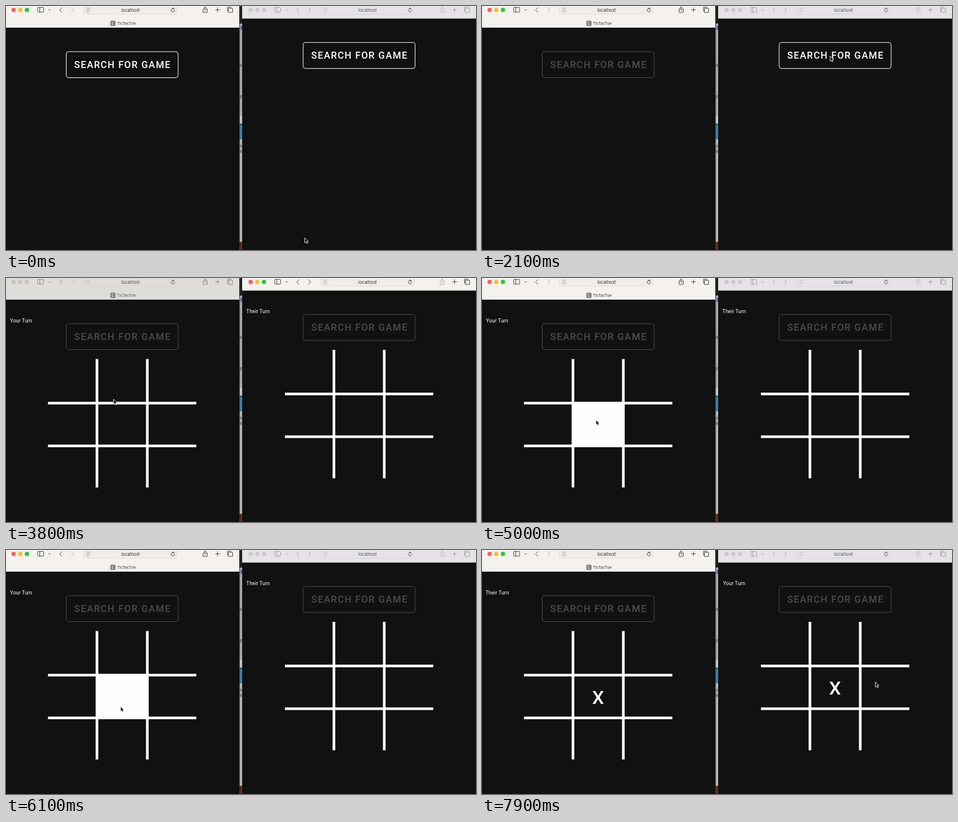
Animation, 800 px wide and 417 px high, one loop 8000 ms. Source, as an HTML page:

```html
<!DOCTYPE html>
<html lang="en">
<head>
<meta charset="utf-8">
<title>TicTacToe</title>
<style>
  html, body { margin: 0; width: 100%; height: 100%; overflow: hidden; background: #111; }
  svg { display: block; width: 100vw; height: 100vh; }
  text { text-anchor: middle; fill: #fff; font-family: Roboto, sans-serif; }
  .ui { font: 7.4px Inter, sans-serif; }
  .start { font-size: 16.2px; font-weight: 500; letter-spacing: 1.3px; }
  .turn { font-size: 8.8px; letter-spacing: .06px; }
  .mark { font-size: 32px; font-weight: 500; }
  .icon { fill: none; stroke-width: 1; stroke-linecap: round; stroke-linejoin: round; }
</style>
</head>
<body>
<svg id="stage" viewBox="0 0 800 417" preserveAspectRatio="none"></svg>
<script>
const LOOP = 8000, TICK = 100;
const FOCUS_RIGHT = 2300, BOARD = 2800, FOCUS_LEFT = 4300, MOVE = 6600;

// Pointer stops: time, x, y
const stops = [
  [100, 508.5, 396], [300, 484.5, 83.5], [500, 484.5, 83.5], [1100, 261.5, 111.5],
  [1400, 261.5, 111.5], [2100, 592.5, 85.5], [2500, 592.5, 85.5], [3100, 433, 200],
  [3200, 433, 200], [3800, 183, 207], [4100, 187, 226], [5000, 194, 242.5],
  [5300, 194, 242.5], [6100, 195, 267.5], [6600, 195, 267.5], [7300, 627, 229],
  [7800, 669.5, 225.5]
];

const clamp = v => Math.max(0, Math.min(1, v));
const ease = v => { v = clamp(v); return v * v * (3 - 2 * v); };
const mix = (a, b, k) => a + (b - a) * k;
const rect = (x, y, w, h, attrs) => `<rect x="${x}" y="${y}" width="${w}" height="${h}" ${attrs}/>`;
const text = (x, y, cls, s, attrs = '') => `<text x="${x}" y="${y}" class="${cls}" ${attrs}>${s}</text>`;
const icon = (d, color) => `<path class="icon" d="${d}" stroke="${color}"/>`;

function pointer(t) {
  const i = stops.findIndex(s => s[0] > t);
  if (i === 0) return stops[0].slice(1);
  if (i < 0) return stops[stops.length - 1].slice(1);
  const [a, b] = [stops[i - 1], stops[i]], k = ease((t - a[0]) / (b[0] - a[0]));
  return [mix(a[1], b[1], k), mix(a[2], b[2], k)];
}

function toolbar(left, active) {
  const bg = active ? '#f4f2ef' : left ? '#dfddda' : '#e5e3e6';
  const dark = active ? '#4b4a49' : left ? '#8b8987' : '#a3a1a4';
  const pale = active ? '#b3b1af' : '#c4c2c2';
  const ink = active ? '#333' : '#555';
  const lights = active ? ['#fe5f57', '#febc2e', '#28c840'] : Array(3).fill(left ? '#c6c4c1' : '#cbc9cc');
  return rect(-1.5, 0, 399, left ? 37 : 21.5, `fill="${bg}"`) +
    lights.map((c, i) => `<circle cx="${13 + 11.3 * i}" cy="6.8" r="3.7" fill="${c}"/>`).join('') +
    icon('M55 2.5h8q1 0 1 1v6q0 1-1 1h-8q-1 0-1-1v-6q0-1 1-1zM57.5 2.5v8', dark) +
    icon('M72.6 6l1.7 1.7L76 6', dark) +
    icon('M95.3 2.8l-4 4 4 4', dark) +
    icon('M111.3 2.8l4 4-4 4', left ? pale : dark) +
    rect(132, -6, 159, 20, `rx="4" fill="${active ? '#efedea' : bg}" stroke="${active ? '#dad8d5' : '#d3d1d2'}" stroke-width=".8"`) +
    icon('M137 3.5h6M137 6h6M137 8.5h2M141 8.5h2M137 10.5h4', pale) +
    text(212, 9.5, 'ui', 'localhost', `style="fill:${ink}"`) +
    icon('M286.6 5.2a3 3 0 1 0 .6 2.2M284.2 3l1.6 1.5-1.6 1.4', ink) +
    icon('M337.5 5h-2v6h7V5h-2M339 8V1.5M337 3.4l2-2 2 2', left ? dark : pale) +
    icon('M356.5 6.5h7M360 3v7', dark) +
    icon('M379 4h6.5v7H379zM377 9V2h6.5', dark) +
    (left ? rect(177.5, 25, 9, 9.2, 'rx="2" fill="#83808e"') + text(182, 32.2, 'ui', 'L') +
      `<text x="189" y="32.2" class="ui" style="fill:${ink};text-anchor:start;font-size:6.7px">TicTacToe</text>` : '');
}

function ripple(t, start, end, x, y) {
  if (t < start || t >= end) return '';
  const k = ease((t - start) / 250), alpha = .15 * clamp((end - t) / 200);
  return `<circle cx="${mix(x, 197.5, k)}" cy="${mix(y, 100, k)}" r="${96 * mix(.3, 1, k)}"
    fill="#fff" opacity="${alpha}" clip-path="url(#button)"/>`;
}

function board(mine, hover, played) {
  const bars = [[152.6, 138.5, 4.5, 219.5], [238.3, 138.5, 4.5, 219.5], [71.5, 211.6, 252.5, 4.5], [71.5, 284.7, 252.5, 4.5]];
  return bars.map(b => rect(...b, 'fill="#fff"')).join('') +
    (hover ? rect(153, 212, 89.5, 77, 'fill="#fefefe"') : '') +
    (played ? text(197.5, 262.6, 'mark', 'X') : '') +
    text(25.8, 76.1, 'turn', mine ? 'Your Turn' : 'Their Turn');
}

function page(t, left, [px, py]) {
  const off = left ? t >= 1600 : t >= BOARD;
  const played = t >= MOVE;
  const hover = left && t >= FOCUS_LEFT && px > 153 && px < 242 && py > 212 && py < 289;
  return (left ? ripple(t, 1200, 1600, 261.5, 111.5) : ripple(t, 2500, BOARD, 189, 101)) +
    `<g opacity="${off ? .24 : 1}">` +
    rect(102.5, 78, 190.5, 44.5, 'rx="4" fill="none" stroke="#fff" stroke-width="1"') +
    text(198.5, 106.1, 'start', 'SEARCH FOR GAME') + '</g>' +
    (t >= BOARD ? board(left !== played, hover, played) : '');
}

// Sliver of the desktop between the two windows
const gap = '<g clip-path="url(#gap)">' +
  [[0, 30, '#222'], [30, 157, '#a6a6a6'], [187, 15, '#c2c2c2'], [202, 26, '#3c84a4'], [228, 175, '#b3b3b3'], [403, 14, '#5c2c19']]
    .map(([y, h, c]) => rect(397, y, 5, h, `fill="${c}"`)).join('') +
  rect(397, 201, 5, 2.5, 'fill="#24566d"') + rect(399, 34, 3, 7, 'fill="#536fa8"') +
  [[104, 'te'], [158, 'in'], [242, 's'], [251, 'e']].map(([y, s]) => text(400, y, 'ui', s, 'style="fill:#333"')).join('') +
  rect(397, 0, .8, 417, 'fill="#333"') + '</g>';

const defs = `<defs><clipPath id="button">${rect(102.5, 78, 190.5, 44.5, 'rx="4"')}</clipPath>
  <clipPath id="gap">${rect(397, 0, 5, 417, '')}</clipPath></defs>`;
const stage = document.getElementById('stage');

function draw(t) {
  const p = pointer(t), rightActive = t >= FOCUS_RIGHT && t < FOCUS_LEFT;
  stage.innerHTML = defs + rect(0, 0, 800, 417, 'fill="#111"') +
    toolbar(true, !rightActive) + page(t, true, p) +
    `<g transform="translate(403.5 0)">${toolbar(false, rightActive)}</g>` +
    `<g transform="translate(403.3 -15.7)">${page(t, false, p)}</g>` + gap +
    `<path transform="translate(${p})" d="M0 0V8.8L2 6.9 3.4 10 4.9 9.3 3.6 6.3H6.3Z" fill="#111" stroke="#fff" stroke-width=".8"/>`;
}

let shown = -1;
function frame(now) {
  const t = Math.floor(now % LOOP / TICK) * TICK;
  if (t !== shown) draw(shown = t);
  requestAnimationFrame(frame);
}
draw(0);
requestAnimationFrame(frame);
</script>
</body>
</html>
```
